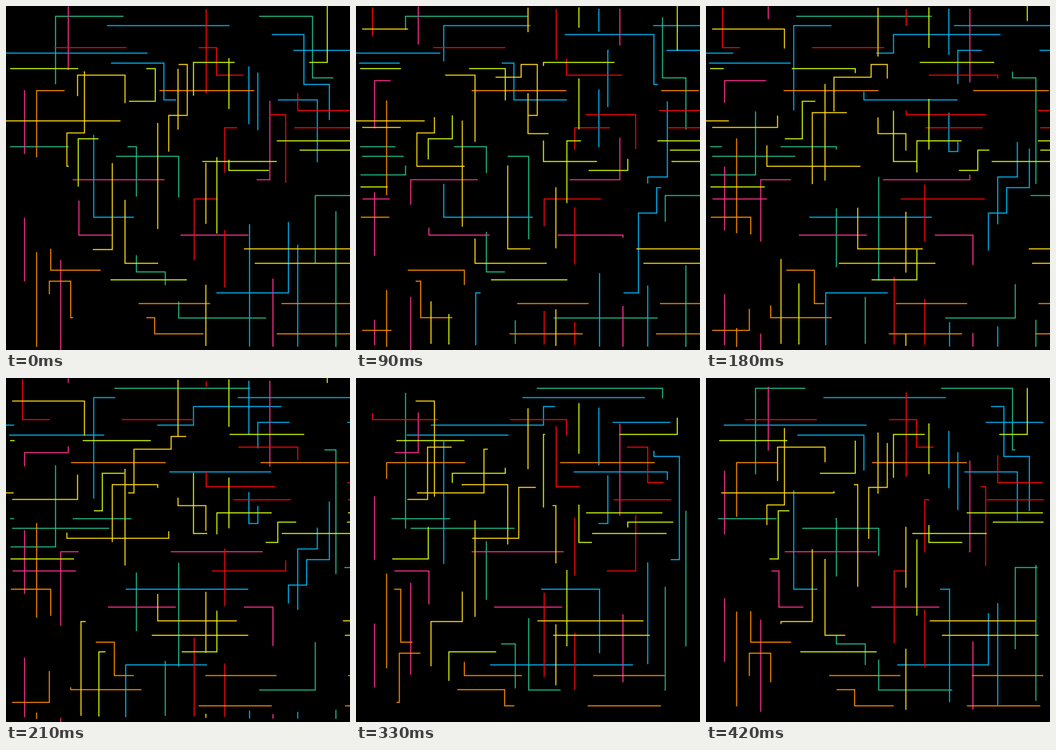
An HTML page that plays this animation: 500 px wide and 500 px high, repeating every 0.45 s.

```html
<!DOCTYPE html>
<html lang="en">
<head>
<meta charset="utf-8">
<title>Running lines</title>
<style>
  html, body { margin: 0; width: 100%; height: 100%; overflow: hidden; background: #000; }
  svg { display: block; width: 100%; height: 100%; }
  /* Each path counts as six units long: three dashes and three gaps. */
  #lines { fill: none; stroke-width: 1.5; stroke-dasharray: 1; }
  .teal { stroke: #20c08f; }
  .blue { stroke: #00b8f8; }
  .pink { stroke: #ff3090; }
  .red { stroke: #f80808; }
  .orange { stroke: #ff8c00; }
  .yellow { stroke: #ffdc10; }
  .lime { stroke: #d4fc08; }
</style>
</head>
<body>
<svg viewBox="0 0 500 500">
  <g id="lines">
    <g class="teal">
      <path pathLength="6" d="M479.5 495.5V104.5H445.5V15H72V245.5H6.5"/>
      <path pathLength="6" d="M6 204.5H189.5V386.5H231.5V491"/>
      <path pathLength="6" d="M502 275.5H449.5V453.5H251V218.5H9"/>
    </g>
    <g class="blue">
      <path pathLength="6" d="M-2 68.5H272.5V41.5H433V114H470V264H437V301H410.5V417H174V493"/>
      <path pathLength="6" d="M501.5 64.5H366V211.5H353V4"/>
      <path pathLength="6" d="M354 495V307H127.5V28.5H503"/>
      <path pathLength="6" d="M424 495V248.5H452.5V136.5H229.5V83H4.5"/>
    </g>
    <g class="pink">
      <path pathLength="6" d="M90.5 0.5V108.5H27V493"/>
      <path pathLength="6" d="M79.5 503V252.5H383.5V4"/>
      <path pathLength="6" d="M388 495V333H106V280.5H9.5"/>
    </g>
    <g class="red">
      <path pathLength="6" d="M502.5 177H318V492.5"/>
      <path pathLength="6" d="M503 152H424V100.500H306V60.500H24V2"/>
      <path pathLength="6" d="M291 4.500V158H406.500V280.500H273.500V492"/>
    </g>
    <g class="orange">
      <path pathLength="6" d="M504 432.5H157.500V384H65V307H7"/>
      <path pathLength="6" d="M500 476.5H216V453H94V400H63V471.5H9"/>
      <path pathLength="6" d="M44.5 495.5V123H498.5"/>
    </g>
    <g class="yellow">
      <path pathLength="6" d="M0 167H186V103.500H240V85H263.500V159H236.500V233H88.500V184.500H114V33.500H9"/>
      <path pathLength="6" d="M500 353H220.500V155H154.500V354H109V491"/>
      <path pathLength="6" d="M502 374H173V100.500H104V176.500H9"/>
      <path pathLength="6" d="M290.500 494V185.500H250V2.500"/>
    </g>
    <g class="lime">
      <path pathLength="6" d="M6 91H217V138.500H140V193H105V263H6.500"/>
      <path pathLength="6" d="M467 0V82H272.500V226H502"/>
      <path pathLength="6" d="M504.500 196H306.500V398H135V492"/>
      <path pathLength="6" d="M500.500 209.500H395V239H324V2"/>
    </g>
  </g>
</svg>
<script>
  const STEP_MS = 30;
  const STEPS = 15;
  const PERIOD = 2; // one dash plus one gap
  const lines = document.getElementById('lines');
  const start = performance.now();

  function draw() {
    const elapsed = performance.now() - start;
    const step = Math.floor(elapsed / STEP_MS) % STEPS;
    lines.style.strokeDashoffset = PERIOD * step / STEPS;
    requestAnimationFrame(draw);
  }

  draw();
</script>
</body>
</html>
```
